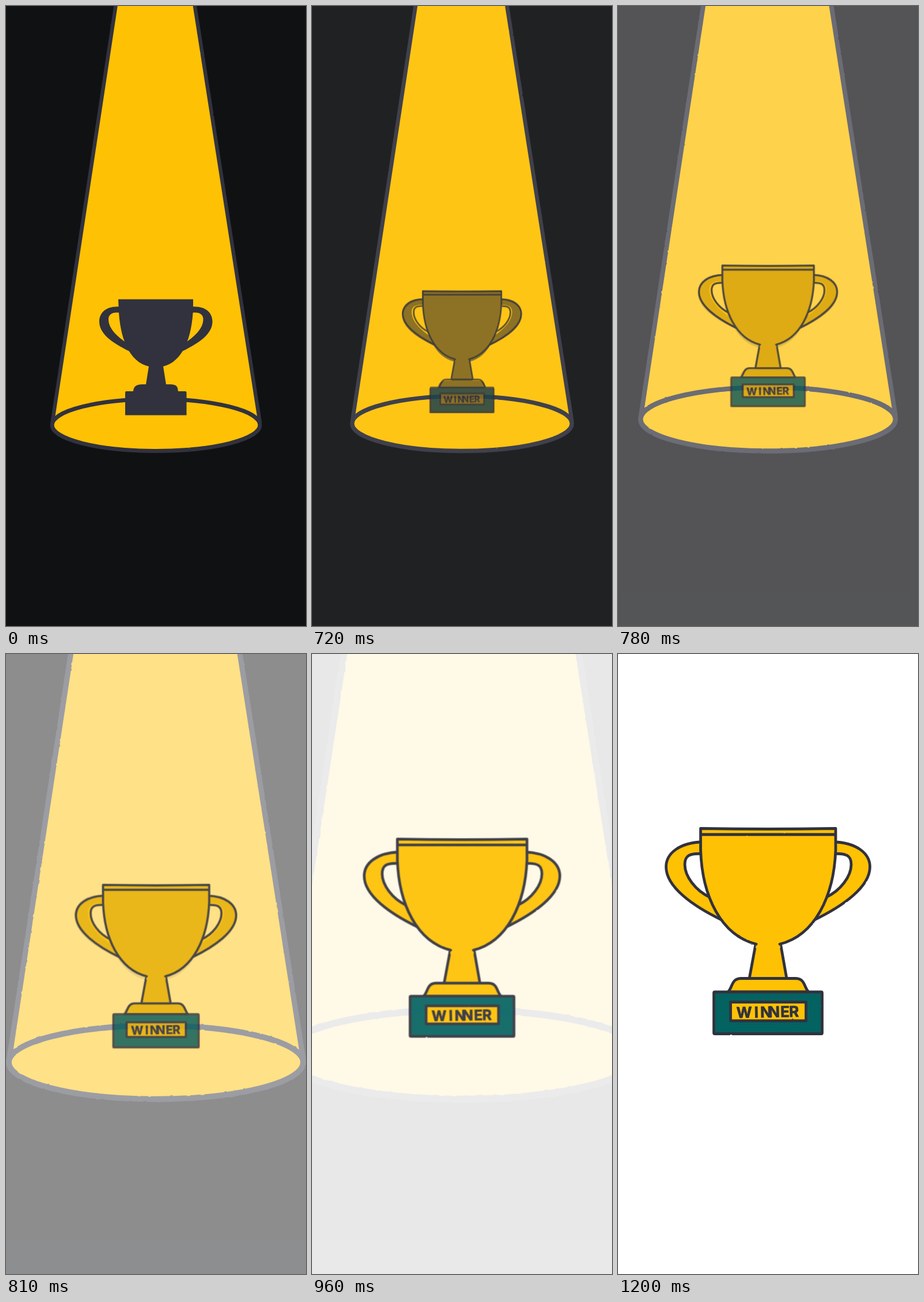
Animation of 521 by 1075 pixels, one loop 1230 ms. Source, as an HTML page:

```html
<!DOCTYPE html>
<html lang="en">
<head>
<meta charset="utf-8">
<title>Trophy in the spotlight</title>
<style>
  html, body { margin: 0; width: 100%; height: 100%; overflow: hidden; background: #fff; }
  svg { display: block; width: 100%; height: 100%; }
  .line { fill: none; stroke: #31323e; stroke-linecap: round; stroke-linejoin: round; }
  .gold { fill: #ffc104; }
  .line.gold { fill: #ffc104; }
  .teal { fill: #046261; }
  text { font: 700 26px Inter, "Open Sans", sans-serif; fill: #31323e; stroke: #31323e; stroke-width: .8; stroke-linejoin: round; }
</style>
</head>
<body>
<svg viewBox="0 0 521 1075" preserveAspectRatio="none">
  <defs>
    <filter id="rough" color-interpolation-filters="sRGB">
      <feTurbulence type="fractalNoise" baseFrequency=".14" numOctaves="1" seed="4"/>
      <feDisplacementMap in="SourceGraphic" scale="1.8" xChannelSelector="R" yChannelSelector="G"/>
    </filter>
    <path id="handle" d="M146 326C108 327 83.500 345 83.500 369C83.500 404 130 437 182 462L160 422C134 410 116 385 116 365C116 350 124 345 146 346.500Z"/>
    <path id="grip" fill-rule="evenodd" d="M197 521.500C174 520 162 532 162 547C162 571 190 587 219 601L211 585C194 574 178 560 178 543C178 535 185 530 197 532Z"/>
  </defs>

  <g id="night">
    <rect width="521" height="1075" fill="#101113"/>
    <g id="beam" filter="url(#rough)">
      <path class="gold" d="M193.500 -20L80 727H441L324.800 -20Z"/>
      <path class="line" stroke-width="6.500" d="M193.500 -20L80.500 722M324.800 -20L441 722"/>
      <ellipse class="line gold" stroke-width="7" cx="260.5" cy="726.5" rx="180.5" ry="45"/>
    </g>
  </g>

  <g id="trophy" filter="url(#rough)">
    <g class="line gold" stroke-width="4.800">
      <use href="#handle"/>
      <use href="#handle" transform="matrix(-1 0 0 1 521 0)"/>
      <path d="M239.500 501L228 563H293L282 501Z"/>
      <path stroke="none" d="M144 302.500Q260 304.500 378 302.500V340C375 420 342 488 281 503L282 510H239L240 503C179 488 146 420 143.500 340Z"/>
      <path fill="none" d="M240 503C179 488 146 420 143.500 340V302.500Q260 304.500 378 302.500V340C375 420 342 488 281 503M144 313H378"/>
      <path d="M191 586C199 578 197 563 213 562.500H309C325 563 323 578 331 586Z"/>
      <rect id="base" class="teal" x="166.500" y="586" width="188" height="72.500" rx="1.500"/>
      <rect x="195.500" y="603.500" width="131" height="32.500"/>
    </g>
    <text x="205.500 236.500 247 261 282 297" y="630" transform="rotate(-1 260 620)">WINNER</text>
  </g>

  <g id="shade" fill="#31323e">
    <use href="#grip"/>
    <use href="#grip" transform="matrix(-1 0 0 1 520.500 0)"/>
    <path d="M195 508.500H325V521C324 576 306 617 273 625L278 656H284C298 656 298 661 299 668H311Q313.500 668 313.500 670V709.500H207V670Q207 668 209 668H221C222 661 224 656 238 656H243L248 625C214 617 197 576 195.500 521Z"/>
  </g>
</svg>
<script>
const LOOP = 1230, STEP = 30, MOVE_FROM = 596, MOVE_TIME = 612, CENTER = 260.5;
const byId = id => document.getElementById(id);
const [night, beam, trophy, base, shade] = ["night", "beam", "trophy", "base", "shade"].map(byId);
const mix = (a, b, k) => a + (b - a) * k;

// Cubic bezier easing (.573, 0, .01, 1)
function ease(x) {
  let low = 0, high = 1, s = .5;
  for (let i = 0; i < 24; i++) {
    s = (low + high) / 2;
    const bx = 3 * s * (1 - s) ** 2 * .573 + 3 * s * s * (1 - s) * .01 + s ** 3;
    if (bx < x) low = s; else high = s;
  }
  return s * s * (3 - 2 * s);
}

function along(points, x) {
  const i = Math.max(1, points.findIndex(([px]) => px >= x));
  const [[x0, y0], [x1, y1]] = [points[i - 1], points[i]];
  return mix(y0, y1, (x - x0) / (x1 - x0));
}

const trophyFade = [[0, .8], [.072, .8], [.284, .85], [.769, .86], [.909, .93], [1, 1]];
const shadeFade = [[0, 1], [.0023, .96], [.072, .55], [.284, .16], [.769, .034], [.909, 0], [1, 0]];

// Scales around the centre line and carries height `from` to height `to`
function place(node, sx, sy, from, to) {
  node.setAttribute("transform",
    `translate(${CENTER} ${to}) scale(${sx} ${sy}) translate(${-CENTER} ${-from})`);
}

function draw(time) {
  const t = Math.floor(time % LOOP / STEP) * STEP;
  const p = t < 630 ? 0 : t >= 1200 ? 1 : ease((t - MOVE_FROM) / MOVE_TIME);
  const top = mix(508, 300, p), spread = mix(1, 1.79, p);

  night.setAttribute("opacity", 1 - p);
  place(beam, spread, spread, 771, 771);

  place(trophy, mix(.5485, 1, p), mix(.557, 1, p), 300, top);
  trophy.setAttribute("opacity", p ? along(trophyFade, p) : 0);
  base.setAttribute("opacity", mix(.86, 1, p));

  place(shade, mix(1, 1.823, p), mix(1, 1.796, p), 508, top);
  shade.setAttribute("opacity", along(shadeFade, p));
}

function tick() {
  draw(performance.now());
  requestAnimationFrame(tick);
}
tick();
</script>
</body>
</html>
```
